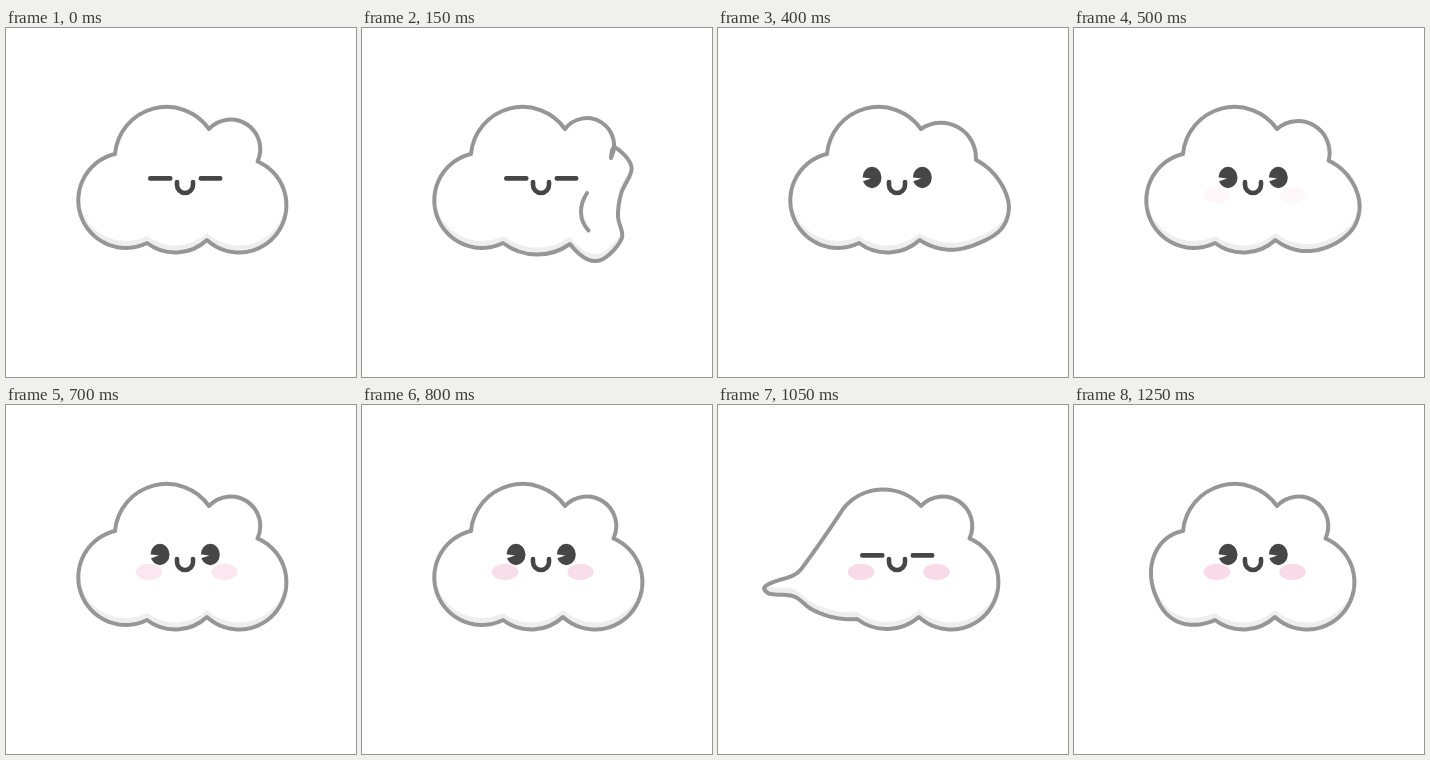
An HTML page for the animation above (1300 ms loop, 350 by 349 pixels).

```html
<!DOCTYPE html>
<html lang="en">
<head>
<meta charset="utf-8">
<title>Punching cloud</title>
<style>
html, body { margin: 0; width: 100%; height: 100%; overflow: hidden; background: #fff; }
svg { display: block; width: 100vw; height: 100vh; }
.line { fill: none; stroke: #969696; stroke-width: 4; stroke-linejoin: round; stroke-linecap: round; }
.ink { fill: none; stroke: #464646; stroke-width: 4.6; stroke-linecap: round; }
</style>
</head>
<body>
<svg viewBox="0 0 350 349">
  <defs>
    <clipPath id="inside"><path class="cloud"/></clipPath>
  </defs>
  <path class="cloud" fill="#eee"/>
  <g clip-path="url(#inside)"><path class="cloud" fill="#fff" transform="translate(0 -7)"/></g>
  <g id="blush" fill="#f8dae9">
    <ellipse cx="143" cy="167" rx="13.2" ry="8.2"/>
    <ellipse cx="218.5" cy="167" rx="13.2" ry="8.2"/>
  </g>
  <path class="cloud line"/>
  <path id="crease" class="line" d="M129 165C137 177 137.5 192 127.5 202.5"/>
  <path id="shut" class="ink" d="M144.3 150.4H164.3M194.8 150.4H214.2"/>
  <g id="open">
    <g id="eye">
      <ellipse cx="154" cy="149.5" rx="9.5" ry="10.7" fill="#464646"/>
      <path d="M142 149L153 150.4L143 154Z" fill="#fff"/>
    </g>
    <use href="#eye" x="50.3"/>
  </g>
  <path class="ink" stroke-width="5" d="M171 154V157a8 8 0 0 0 16 0V154"/>
</svg>
<script>
const LOOP = 1300, STEP = 50, SAMPLES = 90, MIRROR = 354;
const $ = id => document.getElementById(id);
const clouds = document.querySelectorAll('.cloud');
const probe = document.createElementNS('http://www.w3.org/2000/svg', 'path');

const lerp = (a, b, k) => a + (b - a) * k;
const clamp = v => Math.max(0, Math.min(1, v));
const pts = s => s.split(' ').map(p => p.split(',').map(Number));
const flip = list => list.map(([x, y]) => [MIRROR - x, y]).reverse();

// Circular arc from a to b that rises h above the chord.
function bulge(a, b, h) {
  const c = Math.hypot(b[0] - a[0], b[1] - a[1]) / 2;
  const r = (c * c + h * h) / (2 * h);
  return `A${r} ${r} 0 ${h > c ? 1 : 0} 1 ${b}`;
}

// Smooth cubic segments through the points.
function curve(p) {
  const n = p.length - 1;
  const d = p.slice(1).map((q, i) => Math.hypot(q[0] - p[i][0], q[1] - p[i][1]));
  const chord = (i, c) => (p[i + 1][c] - p[i][c]) / d[i];
  const m = p.map((_, i) => [0, 1].map(c =>
    i > 0 && i < n ? (p[i + 1][c] - p[i - 1][c]) / (d[i - 1] + d[i]) : 0));
  for (const c of [0, 1]) {
    m[0][c] = 2 * chord(0, c) - m[1][c];
    m[n][c] = 2 * chord(n - 1, c) - m[n - 1][c];
  }
  const at = (i, s) => [0, 1].map(c => p[i][c] + m[i][c] * s);
  return d.map((len, i) => `C${at(i, len / 3)} ${at(i + 1, -len / 3)} ${p[i + 1]}`).join('');
}

function sample(d) {
  probe.setAttribute('d', d);
  const len = probe.getTotalLength();
  return Array.from({ length: SAMPLES + 1 }, (_, i) => {
    const { x, y } = probe.getPointAtLength(len * i / SAMPLES);
    return [x, y];
  });
}

// A pose is a side lobe plus the height of the lobe above it.
const round = (a, b, h, cap) => ({ lobe: sample('M' + a + bulge(a, b, h)), cap, wind: 0 });
const shape = (a, body, b, cap, wind = 0) =>
  ({ lobe: sample('M' + a + curve([a, ...body, b])), cap, wind });
const blend = (p, q, k) => ({
  lobe: p.lobe.map(([x, y], i) => [lerp(x, q.lobe[i][0], k), lerp(y, q.lobe[i][1], k)]),
  cap: lerp(p.cap, q.cap, k),
  wind: lerp(p.wind, q.wind, k)
});

// Key points of the left arm; the right arm mirrors them.
const wind = pts('119,233 94.5,211 98,188 95,166 84.5,139 101,119.5');
const punch = pts('104,207 66,194 30,201 11,181 26,162 66,172 84,160');
const recoil = pts('116,212.5 94,204.5 76,191.5 51,188.5 46,183 53,178 76,170 84,163');
const stretch = pts('122,220.5 92,214 65,200 58,177 71,150');

const A = [109, 126], B = [203, 101], C = [251.5, 133.5], D = [201, 212], E = [141, 215];
const pulled = [125, 104], rootL = [139, 214], rootR = [206, 213];

const restL = round(E, A, 53, 34);
const stretchL = shape(E, stretch, A, 34);
const leftKeys = [
  [800, restL],
  [950, shape([146, 216], wind, [122, 124], 39, 1)],
  [1000, shape(rootL, punch, pulled, 18)],
  [1050, shape(rootL, recoil, pulled, 18)],
  [1100, blend(restL, stretchL, 0.55)],
  [1250, blend(restL, stretchL, -0.35)],
  [LOOP, restL]
];

const restR = round(C, D, 55.4, 25);
const rightKeys = [
  [0, restR],
  [150, shape([249, 130], flip(wind), [208, 216], 25, 1)],
  [200, shape(C, flip(punch), rootR, 16)],
  [250, shape([259, 133], flip(recoil), rootR, 14)],
  [300, shape([261, 131], flip(stretch), [202, 212], 17)],
  [600, restR]
];

function poseAt(keys, t) {
  const next = keys.findIndex(([time]) => time > t);
  if (next === 0) return keys[0][1];
  if (next < 0) return keys[keys.length - 1][1];
  const [t0, p] = keys[next - 1], [t1, q] = keys[next];
  return blend(p, q, (t - t0) / (t1 - t0));
}

const show = (id, on) => { $(id).style.display = on ? '' : 'none'; };

function draw(t) {
  const l = poseAt(leftKeys, t), r = poseAt(rightKeys, t);
  const foot = l.lobe[0], a = l.lobe[SAMPLES], c = r.lobe[0], d = r.lobe[SAMPLES];
  const outline = 'M' + a + bulge(a, B, l.cap) + bulge(B, c, r.cap) +
    'L' + r.lobe.join(' ') + bulge(d, foot, 11) + 'L' + l.lobe.join(' ') + 'Z';
  clouds.forEach(el => el.setAttribute('d', outline));

  show('crease', Math.max(l.wind, r.wind) > 0.8);
  $('crease').setAttribute('transform', r.wind > 0 ? `matrix(-1 0 0 1 ${MIRROR} 0)` : '');

  const closed = t < 400 || (t >= 1000 && t < 1150);
  show('shut', closed);
  show('open', !closed);
  $('blush').style.opacity = clamp((t - 410) / 450);
}

const start = performance.now();
function tick(now) {
  const t = Math.max(0, now - start) % LOOP;
  draw(Math.floor(t / STEP) * STEP);
  requestAnimationFrame(tick);
}
draw(0);
requestAnimationFrame(tick);
</script>
</body>
</html>
```
